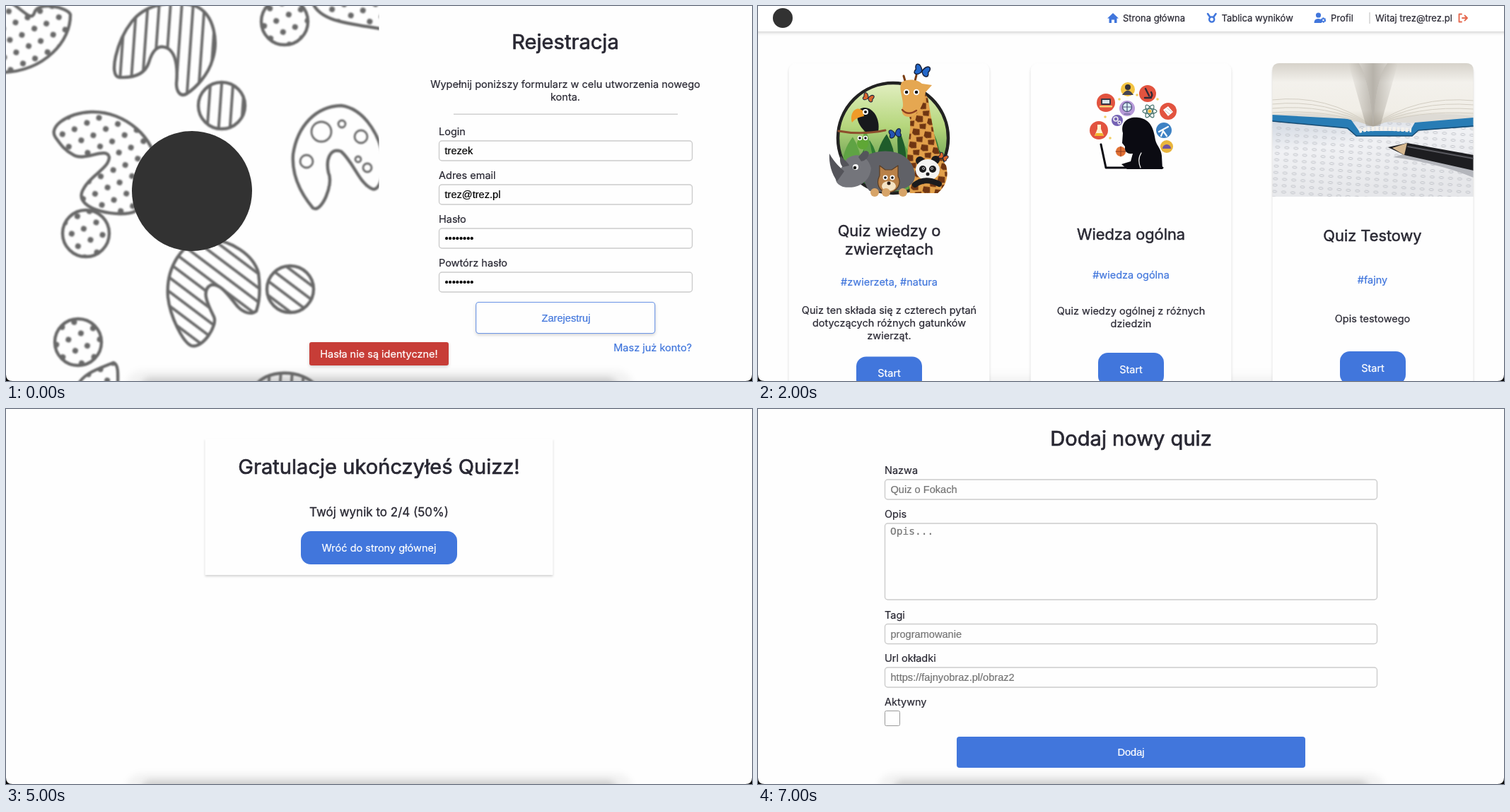
An HTML page for the animation above (8 s loop, 1055 px wide and 531 px high).

```html
<!DOCTYPE html>
<html lang="pl">
<head>
<meta charset="utf-8">
<title>Quiz</title>
<style>
  html, body { margin: 0; width: 100%; height: 100%; overflow: hidden; background: #fefefe; }
  svg { display: block; width: 100%; height: 100%; }
  text {
    --ink: #292833;
    font: 14.5px Inter, sans-serif; font-optical-sizing: none;
    fill: var(--ink); stroke: var(--ink); stroke-width: .22px;
  }
  .h1 { font-size: 29.1px; stroke-width: .7px; }
  .h2 { font-size: 21.8px; stroke-width: .5px; }
  .h3 { font-size: 17px; stroke-width: .3px; }
  .nav { font-size: 13px; }
  .mid { text-anchor: middle; }
  .end { text-anchor: end; }
  .blue { --ink: #4176dc; }
  .white { --ink: #fff; }
  .arial { font-family: "Liberation Sans", Arial, sans-serif; font-size: 14.6px; }
  .value { --ink: #000; }
  .hint { --ink: #757575; }
  .mono { font-family: "DejaVu Sans Mono", monospace; }
  .small { font-size: 10px; font-weight: 700; }
  .box { fill: #fefefe; stroke: #ccc; stroke-width: 1.4; }
  .focus { stroke: #5a8be6; filter: drop-shadow(0 0 2px #4176dc88); }
  .card { fill: #fefefe; filter: drop-shadow(0 2px 1.5px #0000002b); }
  .shade { filter: drop-shadow(0 2px 2px #0000002b); }
  .scene { opacity: 0; animation: show 8s step-end infinite; }
  @keyframes show { 0% { opacity: 1 } 12.5%, 100% { opacity: 0 } }
</style>
</head>
<body>
<svg id="stage" viewBox="0 0 1055 531" preserveAspectRatio="none">
  <defs>
    <clipPath id="left"><rect width="527.5" height="531"/></clipPath>
    <clipPath id="cover"><path d="M727.500 270V91Q727.500 81 737.500 81H1001.500Q1011.500 81 1011.500 91V270Z"/></clipPath>
    <clipPath id="jungle"><circle cx="191" cy="187" r="78"/></clipPath>
    <filter id="soft" x="-10%" y="-10%" width="120%" height="120%"><feGaussianBlur stdDeviation="1"/></filter>
    <filter id="dock" x="-10%" y="-100%" width="120%" height="300%"><feGaussianBlur stdDeviation="5"/></filter>
    <pattern id="dots" width="28" height="26" patternUnits="userSpaceOnUse" patternTransform="rotate(18)">
      <g fill="#686868"><circle cx="6" cy="6" r="4"/><circle cx="20" cy="18" r="4"/></g>
    </pattern>
    <pattern id="bars" width="16" height="16" patternUnits="userSpaceOnUse" patternTransform="rotate(4)">
      <path d="M8 0V16" stroke="#6c6c6c" stroke-width="4"/>
    </pattern>
    <pattern id="slants" width="16" height="16" patternUnits="userSpaceOnUse" patternTransform="rotate(-53)">
      <path d="M8 0V16" stroke="#6c6c6c" stroke-width="4"/>
    </pattern>
    <pattern id="answers" width="13" height="9" patternUnits="userSpaceOnUse" patternTransform="rotate(4)">
      <ellipse cx="6" cy="4" rx="3.200" ry="1.500" fill="none" stroke="#b9bbc1" stroke-width=".8"/>
    </pattern>
    <pattern id="spots" width="17" height="19" patternUnits="userSpaceOnUse" patternTransform="rotate(14)">
      <path d="M0 1L9 0L11 8L4 10L0 8ZM7 12L16 9L17 17L9 18Z" fill="#6f3512"/>
    </pattern>
    <linearGradient id="leaf" x2="0" y2="1"><stop stop-color="#e4f0c4"/><stop offset=".4" stop-color="#b5d67c"/><stop offset="1" stop-color="#2f7430"/></linearGradient>
    <linearGradient id="page" x2="0" y2="1"><stop stop-color="#d6d2ca"/><stop offset=".3" stop-color="#f3f1ec"/><stop offset=".75" stop-color="#f1eee7"/><stop offset="1" stop-color="#cfc9bc"/></linearGradient>
    <linearGradient id="spine"><stop stop-color="#6b6459" stop-opacity="0"/><stop offset=".5" stop-color="#6b6459" stop-opacity=".4"/><stop offset="1" stop-color="#6b6459" stop-opacity="0"/></linearGradient>
    <linearGradient id="paper" x2=".3" y2="1"><stop stop-color="#cfd6e0"/><stop offset=".4" stop-color="#f0f1f4"/><stop offset="1" stop-color="#e6e7ea"/></linearGradient>
  </defs>
</svg>
<script>
const BLUE = '#4176dc', RED = '#d03d36', DARK = '#323232';

const text = (x, y, s, cls = '') => `<text x="${x}" y="${y}" class="${cls}">${s}</text>`;
const lines = (x, y, gap, list, cls) => list.map((s, i) => text(x, y + i * gap, s, cls)).join('');
const rect = (x, y, w, h, fill, r = 0, cls = '') =>
  `<rect x="${x}" y="${y}" width="${w}" height="${h}" rx="${r}" fill="${fill}" class="${cls}"/>`;
const disc = (x, y, r, fill, extra = '') => `<circle cx="${x}" cy="${y}" r="${r}" fill="${fill}" ${extra}/>`;
const path = (d, fill = 'none', extra = '') => `<path d="${d}" fill="${fill}" ${extra}/>`;
const pen = (color, width) => `stroke="${color}" stroke-width="${width}" stroke-linecap="round" stroke-linejoin="round"`;
const at = (x, y, body, more = '') => `<g transform="translate(${x} ${y}) ${more}">${body}</g>`;

// Label, box and content; y is the label's baseline.
const field = (x, y, w, label, value, cls = 'value', focus = '') =>
  text(x, y, label) + rect(x + .5, y + 8, w - 1, 28, '', 4, 'box ' + focus) +
  text(x + 8.5, y + 27, value, 'arial ' + cls);

const button = (x, y, w, h, label, r = 14, cls = '') =>
  rect(x, y, w, h, BLUE, r) + text(x + w / 2, y + h / 2 + 5, label, 'mid white ' + cls);

function pattern() {
  const marks = [
    ['dots', 'M-4 -6L8 -4C24 6 36 22 40 10C44 -8 88 2 91 12C92 50 54 92 -4 94Z'],
    ['bars', 'M160 101C145 99 156 50 178 22C200 -6 240 -8 268 0C296 12 300 52 292 76C286 98 268 116 256 124C246 130 241 120 241 110C243 88 241 68 229 60C214 52 206 66 202 80C196 98 178 102 160 101Z'],
    ['dots', 'M434 -4C444 20 476 24 535 33V-4Z'],
    ['none', 'M434 286C414 262 404 236 406 210C412 170 438 142 474 141C510 146 532 190 534 222C534 246 526 262 518 259C500 252 492 222 474 206C458 200 452 218 456 236C464 252 446 294 434 286Z'],
    ['dots', 'M70 186C60 172 84 152 120 150C170 148 212 190 212 226C212 260 192 282 182 291C164 300 96 290 108 262C118 240 146 230 146 214C142 198 110 222 94 210C82 204 76 194 70 186Z'],
    ['slants', 'M262 481C250 476 232 440 229 412C226 372 248 330 288 330C318 332 350 352 357 378C360 400 358 420 354 432C346 438 336 434 328 426C316 412 304 392 290 395C276 402 284 420 294 440C300 452 278 486 262 481Z'],
    ['dots', 'M100 540C108 520 130 514 152 505C160 508 158 524 158 540Z'],
    ['bars', 'M352 540C364 514 420 512 440 540Z'],
  ];
  const balls = [['bars', 305, 141], ['dots', 394, 22], ['dots', 113, 322], ['slants', 402, 401], ['dots', 102, 476]];
  const holes = [[446, 178, 14], [475, 167, 5], [502, 185, 9], [425, 220, 9], [498, 217, 4], [511, 229, 6]];
  return `<g clip-path="url(#left)"><g filter="url(#soft)" ${pen('#686868', 4.4)}>` +
    marks.map(([p, d]) => path(d, p == 'none' ? p : `url(#${p})`)).join('') +
    balls.map(([p, x, y]) => disc(x, y, 33, `url(#${p})`)).join('') +
    holes.map(([x, y, r]) => disc(x, y, r, 'none', 'stroke-width="2.8"')).join('') +
    '</g></g>' + disc(263, 262, 85, DARK);
}

const rule = y => rect(633, y, 317, 1.4, '#ccc');
const outline = (y, label) =>
  `<rect x="664.7" y="${y}" width="253" height="44" rx="4" fill="#fefefe" stroke="#6b95e6" stroke-width="1.1" class="shade"/>` +
  text(792, y + 27, label, 'mid blue arial');

function signUp() {
  return pattern() + text(791, 60.5, 'Rejestracja', 'h1 mid') +
    lines(791, 116, 18, ['Wypełnij poniższy formularz w celu utworzenia nowego', 'konta.'], 'mid') + rule(152.5) +
    field(612, 183, 359, 'Login', 'trezek') + field(612, 245, 359, 'Adres email', 'trez@trez.pl') +
    field(612, 307, 359, 'Hasło', '••••••••') + field(612, 369, 359, 'Powtórz hasło', '••••••••') +
    outline(419.5, 'Zarejestruj') + text(970, 489, 'Masz już konto?', 'end blue') +
    rect(429, 476, 197, 33, '#c73d37', 3, 'shade') + text(527.5, 498, 'Hasła nie są identyczne!', 'mid white');
}

function signIn() {
  return pattern() + text(791, 131.5, 'Logowanie', 'h1 mid') +
    text(791, 187, 'Wypełnij poniższy formularz w celu zalogowania.', 'mid') + rule(205.5) +
    field(612, 236, 359, 'Login', 'trezek') + field(612, 298, 359, 'Hasło', '••••••••') +
    outline(349, 'Zaloguj') + text(970, 418, 'Nie masz konta?', 'end blue');
}

function navBar() {
  const house = path('M494 17.500L502 10L510 17.500H507.500V24H504V19.500H500V24H496.500V17.500Z', BLUE);
  const medal = path('M636 11L639.500 16M647.500 11L644 16', 'none', pen(BLUE, 2.6)) +
    disc(641.7, 19, 3.6, 'none', pen(BLUE, 2.4));
  const person = disc(792.5, 13, 3.6, BLUE) + path('M786.500 24Q786.500 18 792 18Q796 18 797 20V24Z', BLUE) +
    disc(799.5, 20, 2.7, 'none', `stroke="${BLUE}" stroke-width="2" stroke-dasharray="2.1 .7"`) +
    disc(799.5, 20, 2, 'none', `stroke="${BLUE}" stroke-width="1.5"`);
  const exit = path('M995 11.500H991.500V22.500H995M996 17H1002M999.500 13.500L1003 17L999.500 20.500', 'none', pen('#e5694f', 1.9));
  return rect(-5, -5, 1065, 41, '#fff', 0, 'shade') + disc(35, 17, 14, DARK) + house + medal + person + exit +
    text(516, 21.5, 'Strona główna', 'nav') + text(655.5, 21.5, 'Tablica wyników', 'nav') +
    text(810, 21.5, 'Profil', 'nav') + rect(864.5, 9, 1, 16, '#bbb') + text(873, 21.5, 'Witaj trez@trez.pl', 'nav');
}

const eyes = (x, y, gap, r) => [x, x + gap].map(cx => disc(cx, y, r, '#fff') + disc(cx, y, r * .55, '#111')).join('');
const butterfly = (x, y, color, turn, size = 1) => at(x, y,
  path('M0 0C-5 -12 -14 -9 -9 0C-14 8 -3 9 0 0C3 9 13 8 9 0C14 -9 5 -12 0 0Z', color, pen('#17213c', 1.5)),
  `rotate(${turn}) scale(${size})`);

function animals() {
  let fronds = '';
  for (let i = 0; i < 14; i++) {
    const reach = 40 + 50 * Math.abs(Math.cos(i * .24 * Math.PI));
    fronds += path(`M${112 + i * 12} 262q-14 -${reach * .6} ${i % 2 ? 10 : -10} -${reach}q20 ${reach * .4} 6 ${reach}Z`,
      ['#2f7a33', '#5fa344', '#1f5c2b'][i % 3]);
  }
  const toucan = path('M144 146C158 138 174 156 170 178L154 180C142 170 136 156 144 146Z', '#17181c') +
    path('M148 148C138 140 129 152 133 165C140 157 146 157 150 156Z', '#ef9a28') + disc(152, 150, 4, '#fff') + disc(152, 150, 2, '#111') +
    path('M114 177Q145 183 180 176', 'none', pen('#8d4d2c', 3));
  const frog = disc(148, 195, 8, '#5fa735') + eyes(144, 187, 8, 3.2);
  const rhino = path('M152 212C180 198 220 206 222 240C222 262 184 266 158 262C150 254 144 232 152 212Z', '#606167') +
    path('M126 216C140 206 156 212 160 230C158 250 140 260 120 256C106 250 108 240 116 232Z', '#74757b') +
    path('M112 248C104 238 100 222 101 209C108 222 116 228 122 234Z', '#54545a') +
    path('M120 228C116 224 115 218 117 212C122 218 128 222 129 226Z', '#54545a') +
    path('M142 214Q152 200 157 208Q156 218 146 220Z', '#54555b') + disc(138, 228, 4, '#fff') + disc(137, 229, 2.3, '#111');
  const giraffe = ['#e2a04a', 'url(#spots)'].map(f =>
    path('M212 152C220 162 211 190 211 222L215 265H254Q272 250 266 226C250 205 246 160 240 130L228 112Z', f)).join('') +
    path('M208 106L206 99M222 106L224 98', 'none', pen('#7a3d12', 3)) +
    path('M203 108C212 102 226 104 232 110L246 112L237 122C234 140 228 152 216 157C206 158 201 152 205 142C206 130 198 118 203 108Z', '#e5a751') +
    path('M204 147Q212 156 224 148', 'none', pen('#8c3f20', 2.5)) + eyes(210, 122, 14, 4.2);
  const panda = disc(229, 219, 6, '#1b1b1d') + disc(251, 218, 6, '#1b1b1d') +
    `<ellipse cx="240" cy="232" rx="17" ry="15" fill="#f4f4f2"/>` + disc(233, 231, 5, '#1b1b1d') + disc(247, 231, 5, '#1b1b1d') +
    eyes(234, 230, 12, 1.8) + disc(240, 238, 2.5, '#1b1b1d') + path('M222 253Q236 242 256 252', 'none', pen('#1b1b1d', 8));
  const cat = path('M172 240L172 226L180 232H189L198 226L198 241C204 252 196 264 184 264C172 264 166 252 172 240Z', '#b98148', pen('#593c22', 1.2)) +
    `<ellipse cx="185" cy="255" rx="10" ry="7" fill="#f5e3c4"/>` + eyes(180, 243, 10, 3.4) + disc(185, 251, 2.5, '#2b1c14') +
    [165, 181, 205].map(x => disc(x, 264, 6, '#d7a468')).join('');
  return `<g clip-path="url(#jungle)">${rect(110, 106, 162, 162, 'url(#leaf)')}${fronds}</g>` +
    disc(191, 187, 78, 'none', pen('#222', 4.5)) + toucan + frog + giraffe + rhino + panda + cat +
    butterfly(232, 92, '#2367c9', 15) + butterfly(194, 181, '#2352b4', -10, .8) +
    butterfly(156, 130, '#d8642b', 20, .7) + butterfly(262, 214, '#d8642b', 30, .6);
}

function knowledge() {
  const red = '#e2533f', violet = '#b79ad8';
  const badges = [[492, 137, 13, red], [523, 118, 10, '#f4c443'], [551, 124, 12, red], [580, 149, 12, red], [522, 145, 11, violet],
    [508, 162, 8, '#7562b4'], [482, 176, 13, red], [574, 176, 11, '#3e82c4'], [578, 199, 9, '#e9b53c'], [513, 206, 7, '#e07034']];
  return badges.map(b => disc(...b)).join('') +
    rect(485, 131, 14, 9, '#3b3945', 1) + rect(487, 133, 10, 5, '#d9e6ec') + rect(483, 141, 18, 2.5, '#f5d172', 1) +
    disc(523, 115, 4, '#353138') + path('M515 126Q523 113 531 126Z', '#454452') +
    path('M548 117L553 127M547 130H556M556 122Q560 129 552 130', 'none', pen('#302c39', 2.4)) +
    path('M573 147L580 142L587 150L580 156Z', '#fff') + path('M576 148L582 153M579 145L585 150', 'none', pen('#bbb', 1)) +
    disc(522, 143, 6.5, '#d8eef2', pen('#4f557e', 1.3)) + path('M516 143H528M522 137V149M518 153H526', 'none', pen('#4f557e', 1.2)) +
    disc(506, 160, 3, 'none', pen('#eee', 1.6)) + disc(511, 165, 2, 'none', pen('#eee', 1.4)) +
    path('M480 168H485V174L489 184H476L480 174Z', '#fff2d0') + path('M478 180H487L489 184H476Z', '#f3b52e') +
    [0, 60, 120].map(a => at(554, 149, `<ellipse rx="10" ry="3.700" fill="none" ${pen('#47736c', 1.2)}/>`, `rotate(${a})`)).join('') +
    disc(554, 149, 2.5, '#f4b93b') + path('M567 178L580 171M573 177L570 184M573 177L578 184', 'none', pen('#fff', 2.2)) +
    path('M572 202A6 6 0 0 1 584 202Z', '#7154a0') + path('M506 206H520M513 199V213', 'none', pen('#913b20', 1)) +
    [[511, 132], [536, 126], [565, 132], [498, 187], [491, 157]].map(([x, y]) => disc(x, y, 1.8, '#f2ce63')).join('') +
    path('M485 196L492 229H572', 'none', pen('#0b0b12', 3)) +
    path('M516 180C512 164 524 156 538 158C556 160 560 176 562 190C564 198 570 202 571 212L572 231H522L514 224L527 220L530 209C522 210 518 206 519 199L515 194Z', '#0b0b12') +
    path('M541 229Q536 217 542 208M505 225L520 216', 'none', pen('#fefefe', 1.2));
}

function book() {
  const sheet = 'M727 160L1012 168V270H727Z';
  const edges = [0, 1, 2, 3].map(i =>
    path(`M727 ${133 + i * 6}Q805 ${124 + i * 7} 869 170Q930 ${126 + i * 7} 1012 ${134 + i * 6}`, 'none', pen('#d2cdc2', 1))).join('');
  return `<g clip-path="url(#cover)">` + rect(727, 81, 285, 189, '#dedbd5') +
    path(sheet, 'url(#paper)') + path(sheet, 'url(#answers)') +
    path('M727 154L838 160L850 177H922L929 165L1012 158V171L934 176L925 184H846L832 173L727 163Z', '#287cb5') +
    path('M727 163L834 173L846 184H925L934 176L1012 170', 'none', pen('#174b72', 1.5)) +
    path('M727 81H850Q866 108 870 171Q800 145 727 154Z', 'url(#page)') +
    path('M1012 81H890Q872 105 870 171Q930 145 1012 156Z', 'url(#page)') +
    path('M850 81H890Q872 105 870 171Q866 108 850 81Z', '#e9e6e0') + edges +
    path('M835 81H905L880 170H860Z', 'url(#spine)') +
    path('M850 177Q870 171 924 176', 'none', `stroke="#f4f1ec" stroke-width="6" stroke-dasharray="4 2"`) +
    path('M898 214Q960 222 1012 243V232L920 208Z', '#b4b6bc') +
    path('M891 200L918 194L1012 211V233L914 211Z', '#1d1d20') + path('M897 201L918 194L914 211Z', '#d6b890') +
    path('M919 199L1012 216', 'none', pen('#58585e', 2)) + '</g>';
}

function home() {
  const tile = x => rect(x, 81, 284, 470, '#fefefe', 10, 'card');
  return rect(0, 0, 1055, 531, '#fefefec0') + [43.5, 385.5, 727.5].map(tile).join('') + animals() + knowledge() + book() +
    lines(185.5, 326, 26.4, ['Quiz wiedzy o', 'zwierzętach'], 'h2 mid') + text(185.5, 396, '#zwierzeta, #natura', 'mid blue') +
    lines(185.5, 435.5, 18, ['Quiz ten składa się z czterech pytań', 'dotyczących różnych gatunków', 'zwierząt.'], 'mid') +
    text(527.5, 331, 'Wiedza ogólna', 'h2 mid') + text(527.5, 386, '#wiedza ogólna', 'mid blue') +
    lines(527.5, 437, 18, ['Quiz wiedzy ogólnej z różnych', 'dziedzin'], 'mid') +
    text(869, 333, 'Quiz Testowy', 'h2 mid') + text(869, 393, '#fajny', 'mid blue') + text(869, 448, 'Opis testowego', 'mid') +
    button(139, 496.5, 93, 47, 'Start') + button(481, 491, 93, 47, 'Start') + button(823, 489, 93, 47, 'Start') + navBar();
}

function profile() {
  return rect(211, 20, 633, 492, '#fefefe', 0, 'card') + navBar() +
    text(527.5, 113.5, 'Profil', 'h1 mid') + text(527.5, 174, 'trez@trez.pl', 'h3 mid') +
    text(527.5, 229, 'K-uea4RDgPAImU7LB3Ws', 'h3 mid') +
    field(412.5, 264, 230, 'Imię', 'Trezek') + field(412.5, 326, 230, 'Nazwisko', 'Trezowlik') +
    field(412.5, 387.5, 230, 'Numer telefonu', '907', 'value', 'focus') + rect(445, 402, 1, 15, '#000') +
    rect(438.5, 439, 89, 40, '#fefefe', 10, 'shade') + text(482.5, 462, 'Zapisz', 'arial small mid blue') +
    rect(531, 438.5, 89, 41, RED, 10) + text(575.5, 462, 'Anuluj', 'arial small mid white');
}

function quiz() {
  return rect(281.5, 42, 492, 520, '#fefefe', 0, 'card') +
    text(527.5, 80, 'Quiz wiedzy o zwierzętach', 'h1 mid') + text(527.5, 146, '#zwierzeta, #natura', 'mid blue') +
    lines(527.5, 190, 18, ['Quiz ten składa się z czterech pytań', 'dotyczących różnych gatunków', 'zwierząt.'], 'mid') +
    button(481, 260, 93, 47, 'Start');
}

function result() {
  return rect(281.5, 42, 492, 193, '#fefefe', 0, 'card') +
    text(527.5, 91.5, 'Gratulacje ukończyłeś Quizz!', 'h1 mid') +
    text(527.5, 152, 'Twój wynik to 2/4 (50%)', 'h3 mid') + button(417, 173, 221, 47, 'Wróć do strony głównej');
}

function table(y, cols, rows, marked) {
  const h = 26.7;
  return '<g class="shade">' + rows.map((row, i) => {
    const fill = i == 0 ? BLUE : i == marked ? '#fefefe' : i % 2 ? '#f5f5f5' : '#e8e8e8';
    const cls = i == 0 ? 'white' : i == marked ? 'blue' : '';
    return rect(117, y + i * h, 821, h, fill) + row.map((s, c) => text(cols[c], y + i * h + 18.6, s, cls)).join('');
  }).join('') + '</g>';
}

function ranking() {
  return text(527.5, 70, 'Najlepsi użytkownicy:', 'h1 mid') +
    table(96, [126, 233, 524.5, 817], [
      ['Login', 'Poprawne odpowiedzi', 'Wszystkie odpowiedzi', 'Wynik %'],
      ['wibrek', 4, 4, '100.00'], ['nadzo', 3, 4, '75.00'], ['gosc', 2, 4, '50.00'], ['trez', 2, 4, '50.00']], 4) +
    text(527.5, 366, 'Najpopularniejsze Ovvu:', 'h1 mid') +
    table(392, [126, 520, 713.5], [
      ['Nazwa', 'Liczba prób', '% Poprawnych'],
      ['Quiz wiedzy o zwierzętach', 3, '58.33'], ['Wiedza ogólna', 1, '100.00']]);
}

function addQuiz() {
  return text(527.5, 51.5, 'Dodaj nowy quiz', 'h1 mid') +
    field(179, 92, 697, 'Nazwa', 'Quiz o Fokach', 'hint') +
    text(179, 154, 'Opis') + rect(179.5, 162, 696, 108, '', 4, 'box') + text(187, 178, 'Opis...', 'mono hint') +
    field(179, 296.5, 697, 'Tagi', 'programowanie', 'hint') +
    field(179, 358, 697, 'Url okładki', 'https://fajnyobraz.pl/obraz2', 'hint') +
    text(179, 420, 'Aktywny') + `<rect x="179.5" y="427.5" width="21" height="21" rx="2" fill="#fefefe" stroke="#999"/>` +
    button(281, 464, 493, 44, 'Dodaj', 4, 'arial');
}

const scenes = [signUp, signIn, home, profile, quiz, result, ranking, addQuiz];
const dock = `<g filter="url(#dock)">${rect(170, 516, 716, 40, '#0000000c', 24)}${rect(190, 526, 676, 40, '#00000026', 16)}</g>`;
const corners = path('M0 522Q0 531 9 531H0ZM1055 522Q1055 531 1046 531H1055Z', '#000');

document.getElementById('stage').insertAdjacentHTML('beforeend', dock +
  scenes.map((draw, i) => `<g class="scene" style="animation-delay:${i - 8}s">${draw()}</g>`).join('') + corners);
</script>
</body>
</html>
```
